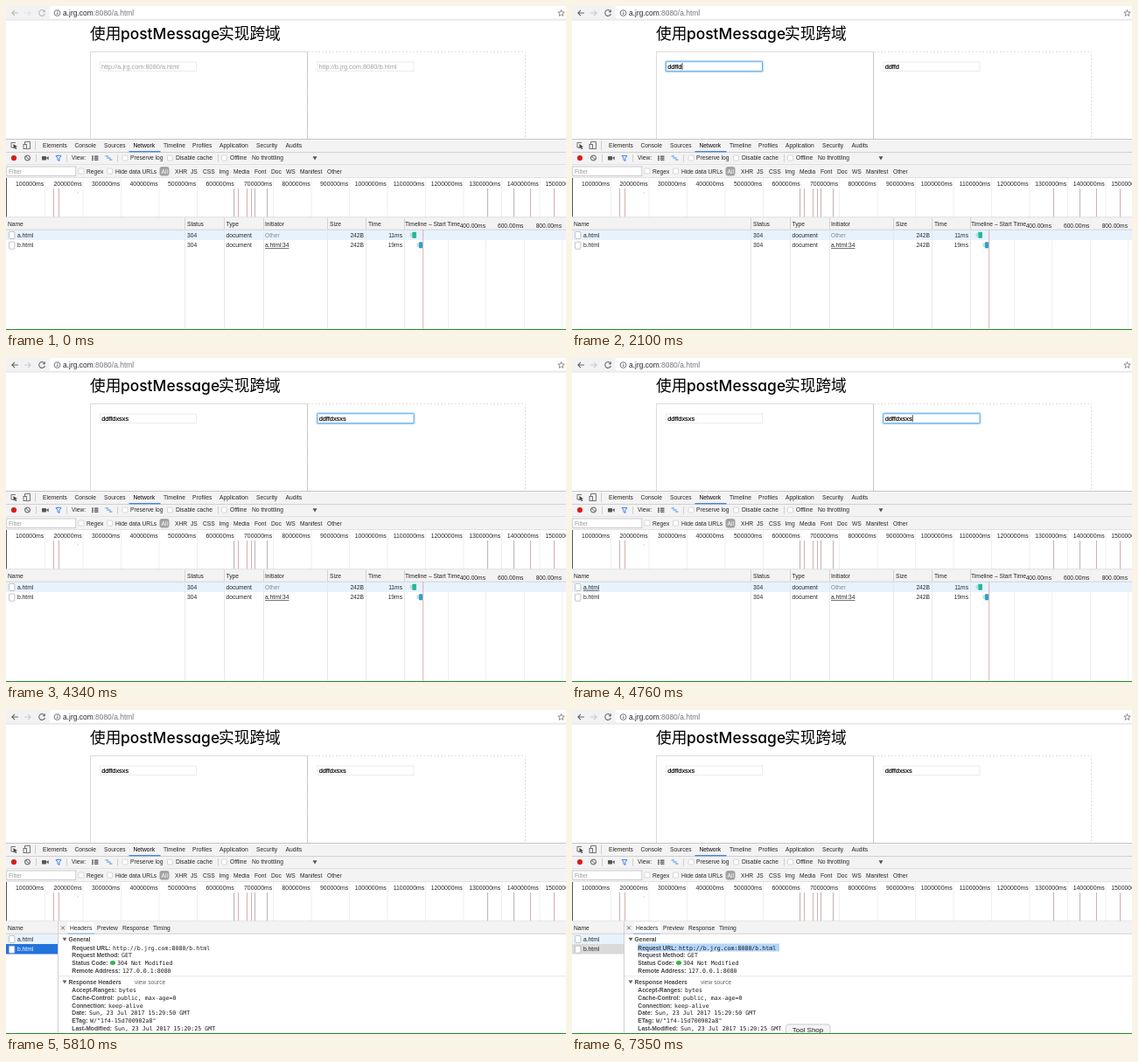
Recreate the animation shown at these times as an HTML page. Size 640x371 px, loop 7420 ms.

```html
<!DOCTYPE html>
<html lang="zh">
<head>
<meta charset="utf-8">
<title>postMessage</title>
<style>
html, body { margin: 0; width: 100%; height: 100%; overflow: hidden; background: #fff; }
svg { display: block; width: 100vw; height: 100vh; }
text { font-family: "Liberation Sans", Arial, sans-serif; font-size: 6.7px; fill: #262626; white-space: pre; }
.url { font-size: 8.45px; }
.cjk { font-family: "Noto Sans CJK SC", "Noto Sans CJK", sans-serif; font-size: 17.7px; font-weight: 500; fill: #000; }
.latin { font-family: Inter, sans-serif; font-size: 17.4px; font-weight: 450; fill: #000; font-feature-settings: "cv11"; }
.field { font-size: 7.35px; fill: #000; }
.typed { stroke: #000; stroke-width: .18px; }
.scale { font-size: 6.9px; }
.mono { font-family: "DejaVu Sans Mono", monospace; font-size: 6.6px; fill: #1a1a1a; }
.bold { font-weight: 700; fill: #444; }
.tip { font-size: 8px; }
.end { text-anchor: end; }
</style>
</head>
<body>
<svg id="stage" viewBox="0 0 640 371" preserveAspectRatio="none" xmlns="http://www.w3.org/2000/svg"></svg>
<script>
const LOOP = 7420, STEP = 70;
const ROW = '#e8f2fd', BAR = '#f3f3f3', EDGE = '#d0d0d0', GRID = '#efefef', PICK = '#2273dc';

const rect = (x, y, w, h, fill, extra = '') =>
  `<rect x="${x}" y="${y}" width="${w}" height="${h}" fill="${fill}" ${extra}/>`;
const path = (d, stroke, width = 1, extra = '') =>
  `<path d="${d}" fill="none" stroke="${stroke}" stroke-width="${width}" ${extra}/>`;
const shape = (d, fill) => `<path d="${d}" fill="${fill}"/>`;
const circle = (x, y, r, fill, extra = '') =>
  `<circle cx="${x}" cy="${y}" r="${r}" fill="${fill}" ${extra}/>`;
const text = (x, y, s, cls = '', extra = '') =>
  `<text x="${x}" y="${y}" class="${cls}" ${extra}>${s}</text>`;
const group = (id, body) => `<g id="${id}">${body}</g>`;
const hline = (y, color = EDGE, x1 = 0, x2 = 640) => path(`M${x1} ${y}H${x2}`, color);
const vline = (x, y1, y2, color = EDGE, w = 1) => path(`M${x} ${y1}V${y2}`, color, w);
const words = (y, items) => items.map(([x, s]) => text(x, y, s)).join('');
const check = (x, y) => rect(x - 3, y - 3, 6, 6, '#fff', 'rx="1" stroke="#c8c8c8" stroke-width=".7"');
const page = y => rect(3.5, y, 6.3, 8, '#fff', 'rx=".8" stroke="#b5b5b5" stroke-width=".8"');

function browser() {
  return rect(0, 0, 640, 16, '#f2f2f2') + rect(49.5, 0, 600, 14.5, '#fff', 'rx="2"') + hline(16, '#e0e0e0') +
    group('nav',
      path('M14 8H7M10 4.8L6.8 8L10 11.2', '#666', 1.1) +
      path('M21 8H28M25 4.8L28.2 8L25 11.2', '#ccc', 1.1) +
      path('M43.8 5.8A3.4 3.4 0 1 0 44.4 9', '#666', 1.1) + shape('M44.8 4V7.2H41.6Z', '#666')) +
    circle(58.5, 8, 3.4, 'none', 'stroke="#666" stroke-width=".9"') +
    path('M58.5 7.5V10M58.5 5.8V6.7', '#666', .9) +
    text(65, 11.2, 'a.jrg.com<tspan fill="#777">:8080/a.html</tspan>', 'url') +
    path('M634.5 4.4L635.5 7H638.2L636.1 8.7L636.9 11.4L634.5 9.8L632.1 11.4L632.9 8.7L630.8 7H633.5Z', '#777', .8) +
    text(96, 38.3, '使用', 'cjk') + text(131, 38.3, 'postMessage', 'latin') + text(243, 38.3, '实现跨域', 'cjk') +
    path('M96.5 152V52.5H344.5', '#dadada') +
    path('M345 52.5H593.5V152', '#e0e0e0', 1, 'stroke-dasharray="2 2"') +
    path('M344.5 53V152', '#dadada') + path('M344.5 53V152', '#b8b8b8', 1, 'stroke-dasharray="1 1"');
}

function field(id, x, host) {
  return rect(x, 64, 110, 10.5, '#fff', 'stroke="#e6e6e6" stroke-width=".8"') +
    group(id + 'Ring',
      rect(x - .6, 63.2, 111.2, 12, 'none', 'rx="1.5" stroke="#b5d8f8" stroke-width="2"') +
      rect(x, 63.8, 110, 10.8, '#fff', 'rx=".6" stroke="#5aa9ea" stroke-width=".9"')) +
    text(x + 1.4, 71.9, `http://${host}.jrg.com:8080/${host}.html`, 'field', `id="${id}Hint" style="fill:#a0a0a0"`) +
    text(x + 1.7, 71.9, '', 'field typed', `id="${id}Text"`) +
    rect(0, 65.3, .8, 7.8, '#111', `id="${id}Caret"`);
}

function toolbars() {
  return rect(0, 152, 640, 45, BAR) + hline(152.5, '#c6c6c6') + hline(167.5) + hline(181.5, '#e2e2e2') + hline(196.5, '#e2e2e2') +
    path('M11 156.5H6V162H8.5', '#666', .9) + shape('M8.5 158L13 161.2L11 161.6L12.3 163.6L11.2 164.2L10 162.2L8.5 163.6Z', '#444') +
    path('M21.5 158V155.5H27.5V163.5H24', '#666', .9) + rect(20, 158.5, 3.5, 5, BAR, 'stroke="#666" stroke-width=".9"') +
    vline(33.5, 154.5, 165) + rect(140.5, 166, 36, 1.4, '#4a86dc') +
    words(161.7, [[42, 'Elements'], [78.5, 'Console'], [112, 'Sources'], [180, 'Timeline'],
      [213, 'Profiles'], [244, 'Application'], [286, 'Security'], [319.5, 'Audits']]) +
    text(145.5, 161.7, 'Network', '', 'style="fill:#000"') +
    circle(9, 174, 3.1, '#d81f1f') +
    circle(24.5, 174, 3, 'none', 'stroke="#555" stroke-width="1"') + path('M22.5 172L26.5 176', '#555') +
    vline(34.5, 170, 178.5) + rect(41, 172, 5, 4.5, '#555', 'rx=".6"') + shape('M46 174L48.6 172V176.5Z', '#555') +
    path('M57 171.5H63L61 174.3V177.5L59 176.3V174.3Z', '#4285f4', 1) + vline(69.5, 170, 178.5) +
    [171.5, 173.5, 175.5].map(y => rect(98, y, 2, 1.3, '#555') + rect(101, y, 4.5, 1.3, '#555')).join('') +
    path('M113.5 172H117M115.5 174H119.5M118 176H121.5', '#4285f4', 1.2) + vline(127.5, 170, 178.5) +
    check(136, 174) + check(187.5, 174) + check(249.5, 174) + vline(242.5, 170, 178.5) +
    words(176.4, [[75, 'View:'], [142, 'Preserve log'], [194, 'Disable cache'], [256, 'Offline'], [281, 'No throttling']]) +
    shape('M350.5 172.2H355.5L353 176.5Z', '#555') +
    rect(.8, 184, 79, 10.5, '#fff', 'stroke="#c0c0c0" stroke-width=".8"') +
    text(3, 191.7, 'Filter', '', 'style="fill:#999"') + check(86, 189) + check(118.5, 189) +
    rect(175.5, 184, 11, 10.5, '#a3a3a3', 'rx="3"') + text(177.5, 191.5, 'All', '', 'style="fill:#fff"') +
    words(191.5, [[92, 'Regex'], [125, 'Hide data URLs'], [193, 'XHR'], [211, 'JS'], [225, 'CSS'], [243.5, 'Img'],
      [260, 'Media'], [284, 'Font'], [303, 'Doc'], [320, 'WS'], [336, 'Manifest'], [367, 'Other']]);
}

function overview() {
  let out = rect(0, 197, 640, 45, '#fff');
  for (let i = 1; i < 16; i++) {
    const x = 43.5 * i;
    out += vline(x + 1, 197, 242, GRID) + text(x - .3, 206, i * 100000 + 'ms', 'scale end');
  }
  const gray = [260.5, 284.5, 298.5, 550.5, 580.5], red = [54.5, 60.5, 265.5, 275.5, 280.5, 599.5, 626.5];
  out += gray.map(x => vline(x, 209, 241.5, '#bdb2b4')).join('');
  out += red.map(x => vline(x, 209, 241.5, '#d6adaf')).join('');
  return out + vline(.5, 197, 241.5, '#555') + circle(82.5, 214, .6, '#aaa') + hline(242);
}

function table() {
  const cols = [204.5, 249.5, 294.5, 367.5, 411.5, 455.5], ticks = [505.5, 548.5, 592.5, 635.5];
  const cells = (y, time, initiator, style) =>
    words(y, [[207, '304'], [251.5, 'document']]) + text(296, y, initiator, '', `style="${style}"`) +
    text(409, y, '242B', 'end') + text(453, y, time, 'end');
  return rect(0, 256.5, 640, 114, '#fff') + rect(0, 256.5, 640, 11.5, ROW) +
    rect(0, 268, 640, 11.5, ROW, 'id="rowHover"') +
    rect(0, 242.5, 640, 13.5, BAR) + hline(256.2) +
    cols.map(x => vline(x, 242.5, 256, '#d4d4d4') + vline(x, 256, 370, '#e8e8e8')).join('') +
    ticks.map(x => vline(x, 242.5, 370, GRID)).join('') +
    words(251.7, [[2, 'Name'], [207, 'Status'], [251.5, 'Type'], [296, 'Initiator'], [370, 'Size'], [414, 'Time'],
      [456, 'Timeline – Start Time']]) +
    [548, 591.3, 635].map((x, i) => text(x, 253.6, 400 + 200 * i + '.00ms', 'end')).join('') +
    cells(264.9, '11ms', 'Other', 'fill:#888') +
    cells(276.4, '19ms', 'a.html:34', 'text-decoration:underline') +
    rect(461.5, 260, 3, 4.5, '#c5dcd8') + rect(464.3, 258.8, 4.6, 7, '#1fb99c') +
    rect(469.5, 271.5, 2.7, 4.5, '#c5d8e2') + rect(472, 270.3, 4.2, 7, '#27a5c9') +
    vline(476.7, 256, 370, '#dfaeb3') +
    page(258.5) + page(270.2) +
    text(13, 264.9, 'a.html', '', 'id="nameA"') + text(13, 276.4, 'b.html', '', 'id="nameB"');
}

function details() {
  const entry = (y, label, x, value) => text(75.3, y, label + ':', 'bold') + text(x, y, value, 'mono');
  const section = (y, label) => shape(`M64.5 ${y - 4.6}H69.5L67 ${y - .5}Z`, '#666') + text(71.5, y, label, 'bold');
  const general = [['Request URL', 122, 'http://b.jrg.com:8080/b.html'], ['Request Method', 132, 'GET'],
    ['Status Code', 127, '304 Not Modified'], ['Remote Address', 133, '127.0.0.1:8080']];
  const response = [['Accept-Ranges', 129, 'bytes'], ['Cache-Control', 127, 'public, max-age=0'],
    ['Connection', 117, 'keep-alive'], ['Date', 95, 'Sun, 23 Jul 2017 15:29:50 GMT'],
    ['ETag', 96, 'W/"1f4-15d700902a8"'], ['Last-Modified', 124, 'Sun, 23 Jul 2017 15:20:25 GMT']];
  const list = (rows, y) => rows.map(([label, x, value], i) => entry(y + 8.75 * i, label, x, value)).join('');
  return rect(0, 242.5, 640, 128, '#fff') + rect(0, 242.5, 640, 13.5, BAR) +
    rect(0, 256.5, 59, 11.5, ROW) + rect(0, 268, 59, 11.5, PICK, 'id="picked"') +
    hline(256.2) + vline(59.5, 242.5, 370) +
    path('M63 247.5L67 251.5M67 247.5L63 251.5', '#555', .9) +
    rect(70.5, 243, 30.5, 13, '#fff') + rect(70.5, 255.6, 30.5, .8, '#5a92e0') +
    words(251.7, [[2, 'Name'], [73, 'Headers'], [104, 'Preview'], [133, 'Response'], [168, 'Timing']]) +
    page(258.5) + page(270.2) + text(13, 264.9, 'a.html') + text(13, 276.4, 'b.html', '', 'id="pickedName"') +
    rect(75, 267.5, 162, 9, '#b4d6fc', 'id="selection"') +
    section(265.3, 'General') + list(general, 274.6) +
    '<ellipse cx="122" cy="289.6" rx="3.1" ry="2.5" fill="#3cb54a"/>' +
    hline(304.8, '#e6e6e6', 60) +
    section(314, 'Response Headers') + text(147, 314, 'view source', '', 'style="fill:#666"') + list(response, 323);
}

const stage = document.getElementById('stage');
stage.innerHTML = rect(0, 0, 640, 371, '#fff') + browser() +
  field('left', 107.5, 'a') + field('right', 356, 'b') + toolbars() + overview() +
  group('table', table()) + group('details', details()) +
  group('tip', rect(244.5, 360, 50.5, 15, '#f4f4f4', 'rx="3" stroke="#c6c6c6" stroke-width=".9"') +
    text(251.7, 369.3, 'Tool Shop', 'tip')) +
  rect(0, 370, 640, 1, '#238a28');

const el = {};
stage.querySelectorAll('[id]').forEach(node => el[node.id] = node);
const show = (id, on) => el[id].setAttribute('visibility', on ? 'inherit' : 'hidden');

const MESSAGE = 'ddffdxsxs';
const KEYS = [1400, 1470, 1610, 1680, 1810, 3150, 3290, 3430, 3600];
const FOCUS = { left: [910, 2660], right: [2660, 5040] };
const READY = 350, OPEN = 5180, SELECT = 6580, TIP = 7000;

function drawField(id, t, typed) {
  const [from, to] = FOCUS[id];
  const active = t >= from && t < to;
  const touched = Math.max(from, ...KEYS.filter(k => k <= t));
  el[id + 'Text'].textContent = typed;
  show(id + 'Hint', !typed);
  show(id + 'Ring', active);
  show(id + 'Caret', active && Math.floor((t - touched) / 500) % 2 === 0);
  const x = +el[id + 'Text'].getAttribute('x');
  el[id + 'Caret'].setAttribute('x', x + (typed ? el[id + 'Text'].getComputedTextLength() : 0) + .2);
}

function draw(ms) {
  const t = Math.floor((ms % LOOP) / STEP) * STEP;
  const typed = MESSAGE.slice(0, KEYS.filter(k => k <= t).length);
  drawField('left', t, typed);
  drawField('right', t, typed);
  const overA = t >= 4690 && t < 4970, overB = t >= 4970 && t < OPEN;
  el.nameA.style.textDecoration = overA ? 'underline' : 'none';
  el.nameB.style.textDecoration = overB ? 'underline' : 'none';
  el.nav.setAttribute('opacity', t < READY ? .4 : 1);
  show('table', t < OPEN);
  show('rowHover', overB);
  show('details', t >= OPEN);
  const selected = t >= SELECT;
  show('selection', selected);
  el.picked.setAttribute('fill', selected ? '#dadada' : PICK);
  el.pickedName.style.fill = selected ? '#262626' : '#fff';
  show('tip', t >= TIP);
}

const start = performance.now();
function tick() {
  draw(performance.now() - start);
  requestAnimationFrame(tick);
}
tick();
</script>
</body>
</html>
```
